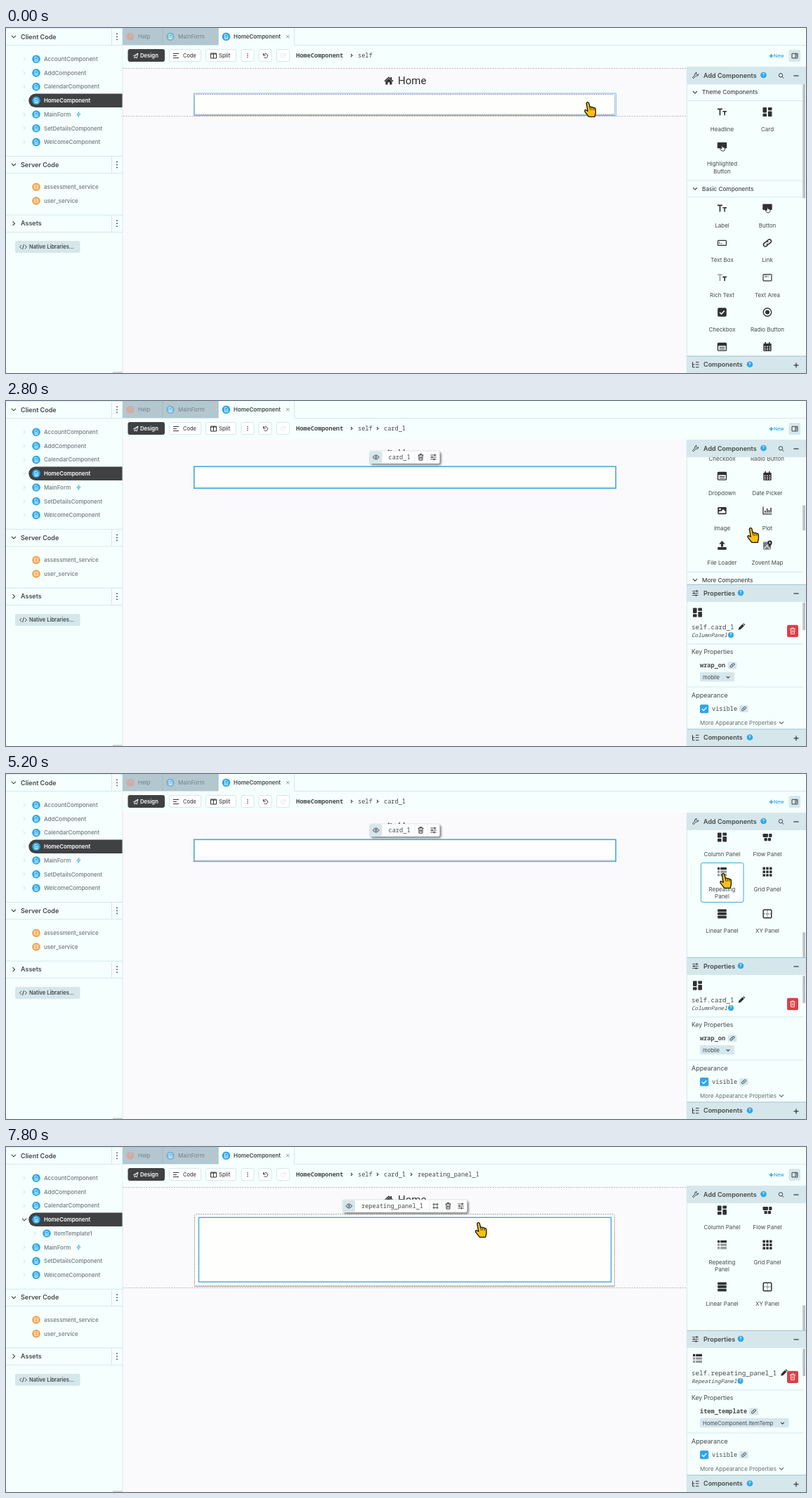
An HTML page that plays this animation: 1139x491 px, repeating every 8 s.

```html
<!DOCTYPE html>
<html lang="en">
<head>
<meta charset="utf-8">
<title>App designer</title>
<style>
html, body { margin: 0; width: 100%; height: 100%; overflow: hidden; background: #f5fffd; }
svg { display: block; width: 100%; height: 100%; }
text { font-family: Inter, sans-serif; font-size: 8px; fill: #43484b; white-space: pre; }
.mono { font-family: "Noto Sans Mono", monospace; }
</style>
</head>
<body>
<svg id="stage" viewBox="0 0 1139 491"></svg>
<script>
const stage = document.getElementById('stage');
const MINT = '#f5fffd', PALE = '#d6e7ec', BLUE = '#2ea7e6', DARK = '#3f4143', INK = '#2f3133', ORANGE = '#f3a14d';
const EDGE = '#9cc5d3', SOFT_BLUE = '#45a9d6';

// Basic shapes
const rect = (x, y, w, h, fill, more = '') => `<rect x="${x}" y="${y}" width="${w}" height="${h}" fill="${fill}" ${more}/>`;
const circle = (x, y, r, fill, more = '') => `<circle cx="${x}" cy="${y}" r="${r}" fill="${fill}" ${more}/>`;
const line = (d, color, width = 1, more = '') => `<path d="${d}" fill="none" stroke="${color}" stroke-width="${width}" ${more}/>`;
const fill = (d, color) => `<path d="${d}" fill="${color}"/>`;
const at = (x, y, body) => `<g transform="translate(${x} ${y})">${body}</g>`;
const text = (x, y, s, size = 8, more = '') =>
  `<text x="${x}" y="${y + size * .36}" style="font-size:${size}px;${more}">${s}</text>`;
const mono = (x, y, s, size = 8.62, more = '') =>
  `<text class="mono" x="${x}" y="${y + size * .33}" style="font-size:${size}px;${more}">${s}</text>`;
const centered = 'text-anchor:middle;';
const chevronDown = (x, y, color = DARK, r = 3) => line(`M${x - r} ${y - r / 2}l${r} ${r}l${r} ${-r}`, color, 1.1);
const chevronRight = (x, y, color = DARK, r = 3) => line(`M${x - r / 2} ${y - r}l${r} ${r}l${-r} ${r}`, color, 1.1);
const dots = (x, y, gap = 4, r = .9) => [-gap, 0, gap].map(d => circle(x, y + d, r, DARK)).join('');
const help = (x, y, r = 4.3) => circle(x, y, r, BLUE) +
  text(x, y, '?', r * 1.4, centered + 'fill:#fff;font-weight:600');
const docBadge = (x, y, color = BLUE) => circle(x, y, 5.8, color) +
  at(x, y, line('M-2-3h2.6l1.6 1.6v4.6h-4.2zM-.9 .2h1.9M-.9 1.7h1.9', '#fff', .8));
const dbBadge = (x, y) => circle(x, y, 5.8, ORANGE) +
  line(`M${x - 2.6} ${y - 2.6}h5.2v5.2h-5.2zM${x - 2.6} ${y}h5.2`, '#fff', .8);
const minus = (x, y) => line(`M${x - 3.5} ${y}h7`, INK, 1.2);

const table = heads => rect(-6, -5, 12, 10, 'none', `stroke="${INK}" stroke-width="1.4" rx="1"`) +
  rect(-6, -5, 12, heads, INK) + line('M0-4v9M-6 1.5h12', INK, 1.2);
const grid = (size, step) => [-1, 0, 1].map(r => [-1, 0, 1].map(c =>
  rect(c * step - size / 2, r * step - size / 2, size, size, INK, 'rx=".6"')).join('')).join('');
const letters = (small = INK) => line('M-6.5-4.2h7M-3-4.2v9', small === INK ? INK : '#999fa2', 1.7) +
  line('M.8-.8h5.8M3.7-.8v5.6', INK, 1.6);
const chain = (scale, width) => `<g transform="rotate(-40) scale(${scale})">` +
  line('M-.6 2.3h-2.9a2.3 2.3 0 0 1 0-4.6h2.9a2.3 2.3 0 0 1 2.1 2.3M.6-2.3h2.9a2.3 2.3 0 0 1 0 4.6h-2.9a2.3 2.3 0 0 1-2.1-2.3', INK, width) + '</g>';

const icons = {
  letters: letters(),
  rich: letters('#888'),
  card: rect(-6.5, -6.5, 5.6, 7.4, INK, 'rx=".8"') + rect(-6.5, 2.2, 5.6, 4.3, INK, 'rx=".8"') +
    rect(.9, -6.5, 5.6, 4.3, INK, 'rx=".8"') + rect(.9, -.9, 5.6, 7.4, INK, 'rx=".8"'),
  button: rect(-6.7, -6, 13.4, 8.5, INK, 'rx="1"') +
    `<path d="M0-2.5l1 3.2 3 1v2.5l-1.2 2H-.5L-3 3.2l1-.8 1 .8z" fill="#eef5f5" stroke="${INK}" stroke-width=".9"/>`,
  field: rect(-6, -3.5, 12, 7, 'none', `stroke="${INK}" stroke-width="1.2" rx="1"`) + line('M-3.8-1.4v2.8M-2 1h2', INK, .9),
  chain: chain(1.1, 1.4),
  area: rect(-6, -4.6, 12, 9.2, 'none', `stroke="${INK}" stroke-width="1.2" rx="1"`) + text(-4.2, -1.3, 'abc', 4),
  check: rect(-6.3, -6.3, 12.6, 12.6, INK, 'rx="1.8"') + line('M-3.3.2l2.4 2.4 4.2-4.6', '#fff', 1.5),
  radio: circle(0, 0, 5.7, 'none', `stroke="${INK}" stroke-width="1.4"`) + circle(0, 0, 3, INK),
  list: rect(-6, -5.3, 12, 10.6, 'none', `stroke="${INK}" stroke-width="1.4" rx="1.2"`) + rect(-6, -5.3, 12, 3.8, INK) +
    line('M-3.8 .7h7.6M-3.8 3h7.6', INK, 1.1),
  date: rect(-5.7, -4.8, 11.4, 11, INK, 'rx="1"') + line('M-2.8-6.8v3M2.8-6.8v3', INK, 1.6) +
    line('M-4.3-.4h8.6M-4.3 2h8.6M-4.3 4.3h8.6', '#fff', 1.2, 'stroke-dasharray="1.7 1.75"'),
  image: rect(-6.2, -5.2, 12.4, 10.4, INK, 'rx="1.4"') + circle(-3, -2.2, 1.3, '#fff') + fill('M-4.8 3.5v-1.4l2-2 1.3 1.2 3-3.3 3.3 3.2v2.3z', '#fff'),
  plot: line('M-6-5.6v10.4h12.3', INK, 1.3) + line('M-3 3v-3M-.3 3v-6M2.4 3v-4M5 3v-7', INK, 1.5),
  upload: fill('M0-6.5l4.3 4.6h-2.8v4h-3v-4h-2.8z', INK) + rect(-6.3, 2.6, 12.6, 3.8, INK, 'rx=".8"'),
  map: rect(-6, -5, 11, 11, '#777d80', 'rx="1"') + line('M-5 5l9-9M-1 .5l5 5', '#e9efef', 1.2) +
    fill('M3.5 2.2C1-1 .3-2.1.3-3.6a3.2 3.2 0 0 1 6.4 0c0 1.5-.7 2.6-3.2 5.8z', INK) + circle(3.5, -3.6, 1.1, '#fff'),
  clock: circle(0, 0, 5.7, 'none', `stroke="${INK}" stroke-width="1.4"`) + line('M0-3.3v3.5l2.5 1.5', INK, 1.3),
  spacer: line('M0-6v12M-3-3l3-3 3 3M-3 3l3 3 3-3', INK, 1.4),
  video: rect(-6.5, -4.8, 13, 9.6, INK, 'rx="2"') + fill('M-1.8-2.6l4.4 2.6-4.4 2.6z', '#fff'),
  table: table(3.2),
  tableRow: table(4.6),
  flow: rect(-6.5, -5, 7.5, 5, INK, 'rx=".8"') + rect(2.2, -5, 4.3, 5, INK, 'rx=".8"') +
    rect(-4.5, 1.2, 4.3, 4.2, INK, 'rx=".8"') + rect(.8, 1.2, 4.3, 4.2, INK, 'rx=".8"'),
  repeat: [-4.6, 0, 4.6].map((y, i) => rect(-6.5, y - 1.7, 3.2, 3.3, i ? '#95999c' : INK) +
    rect(-2.3, y - 1.7, 8.8, 3.3, i ? '#95999c' : INK)).join(''),
  grid: grid(3.6, 4.8),
  linear: [-4.6, 0, 4.6].map(y => rect(-6.3, y - 1.9, 12.6, 3.7, INK, 'rx=".6"')).join(''),
  xy: rect(-5.8, -5.8, 11.6, 11.6, 'none', `stroke="${INK}" stroke-width="1.5" rx="1"`) +
    line('M0-4.5v9M-4.5 0h9', INK, 1, 'stroke-dasharray="1.4 1.3"'),
  eye: line('M-4.5 0q4.5-6 9 0q-4.5 6-9 0z', INK, .9) + circle(0, 0, 1.3, 'none', `stroke="${INK}" stroke-width=".8"`),
  trash: line('M-3.8-3h7.6M-1.3-3.2v-1.2h2.6v1.2M-2.8-3l.4 7.2h4.8l.4-7.2M-.9-1v3.4M.9-1v3.4', 'currentColor', .8),
  sliders: line('M-4.3-3h8.6M-4.3 0h8.6M-4.3 3h8.6', INK, .8) + line('M2-4.2v2.4M-2-1.2v2.4M1 1.8v2.4', INK, 1.3),
  crop: line('M-4-2.5h8M-4 2.5h8M-2.5-4v8M2.5-4v8', INK, .8),
  pencil: fill('M-4.3 4.3l.8-3.2 5-5 2.4 2.4-5 5zM2.2-4.4l1-.9 2.2 2.2-.9 1z', INK),
  tree: line('M-4-4v7.5h3M-4-.3h3M.5-3.6h4.5M.5-.3h4.5M.5 3.5h4.5', INK, 1),
  wrench: line('M1.6-4.2a2.7 2.7 0 0 0-2.2 3.7l-3.5 3.4 1.3 1.3 3.5-3.4a2.7 2.7 0 0 0 3.6-2.6l-1.6 1.2-1.7-1.7z', INK, .9),
  link: rect(-6.3, -5, 12.6, 10, PALE, 'rx="1.8"') + chain(.62, 1.3),
};
const icon = (name, x, y) => at(x, y, icons[name]);

const sections = [
  ['Theme Components', 'Headline letters', 'Card card', 'Highlighted|Button button'],
  ['Basic Components', 'Label letters', 'Button button', 'Text Box field', 'Link chain', 'Rich Text rich', 'Text Area area',
    'Checkbox check', 'Radio Button radio', 'Dropdown list', 'Date Picker date', 'Image image', 'Plot plot',
    'File Loader upload', 'Zovent Map map'],
  ['More Components', 'Spacer spacer', 'Timer clock', 'Canvas area', 'Video video', 'Slot field', 'Hidden Box xy',
    'Data Grid table', 'Data Row Panel tableRow', 'Column Panel card', 'Flow Panel flow', 'Repeating|Panel repeat',
    'Grid Panel grid', 'Linear Panel linear', 'XY Panel xy'],
];

function componentList(highlight) {
  let y = 91.5, out = '';
  for (const [title, ...items] of sections) {
    out += line(`M969 ${y - 11.5}h166M969 ${y + 12}h166`, PALE) + chevronDown(981, y) +
      text(991, y, title, 8.2, 'font-weight:500');
    y += 28;
    for (let i = 0; i < items.length; i += 2) {
      let extra = 0;
      items.slice(i, i + 2).forEach((item, col) => {
        const cut = item.lastIndexOf(' '), words = item.slice(0, cut).split('|'), x = col ? 1084 : 1019.5;
        const name = item.slice(cut + 1);
        if (highlight && name === 'repeat') {
          out += rect(989.5, Math.round(y - 13) + .5, 60.5, 56, '#fbffff', `rx="2.5" stroke="${SOFT_BLUE}"`);
        }
        out += icon(name, x, y) + words.map((w, n) => text(x, y + 24.6 + n * 10.4, w, 8, centered)).join('');
        if (words.length > 1) extra = 10.5;
      });
      y += 49.3 + extra;
    }
  }
  return out;
}

function sidebar(dropped) {
  const shift = dropped ? 19.7 : 0;
  const names = ['AccountComponent', 'AddComponent', 'CalendarComponent', 'HomeComponent', 'MainForm', 'SetDetailsComponent', 'WelcomeComponent'];
  const head = (y, label, open) => line(`M0 ${y - 12}h166M0 ${y + 12.3}h166M150.5 ${y - 12}v24`, PALE) +
    (open ? chevronDown : chevronRight)(11, y) + text(21, y, label, 9, 'font-weight:600') + dots(158, y);
  const soft = 'font-weight:500;fill:#70787d';
  let out = rect(0, 0, 166, 491, MINT) + head(12.3, 'Client Code', true);
  names.forEach((name, i) => {
    const y = 44.2 + i * 19.7 + (i > 3 ? shift : 0), active = i === 3;
    if (active) out += `<path d="M166 ${y - 9.7}H42a9.7 9.7 0 0 0 0 19.4H166z" fill="${DARK}"/>`;
    out += (active && dropped ? chevronDown(26, y) : chevronRight(26, y, '#dce9e9', 2.5)) + docBadge(43, y) +
      text(54, y, name, active ? 7.8 : 8, active ? 'font-weight:600;fill:#fff' : soft);
    if (i === 4) out += line(`M104 ${y - 3.5}l-3.2 4h2.6l-.8 3 3.4-4.2h-2.6z`, BLUE, .8);
  });
  if (dropped) out += chevronRight(41, 123, '#dce9e9', 2.5) + docBadge(58, 123) + text(68, 123, 'ItemTemplate1', 8, soft);
  return out + at(0, shift, head(194.5, 'Server Code', true) +
    dbBadge(43, 226.3) + text(54, 226.3, 'assessment_service', 8, soft) +
    dbBadge(43, 246) + text(54, 246, 'user_service', 8, soft) + head(278.2, 'Assets', false) +
    rect(13, 303, 92.5, 17, PALE, 'rx="2"') + line('M22 309l-2.5 2.5 2.5 2.5M27 309l2.5 2.5-2.5 2.5M25.5 308l-2 7', INK, .9) +
    text(33, 311.3, 'Native Libraries...', 7.5, 'font-weight:600')) + rect(152, 489.5, 14, 1.5, '#c3cccc') +
    line('M166 0v491', PALE);
}

function topBars(selected, dropped) {
  const box = (x, w, color = '#fff') => rect(x, 30.5, w, 17, color, `rx="2" stroke="${color === '#fff' ? PALE : color}"`);
  const crumbs = [['self', 501], ...(selected ? [['card_1', 538]] : []), ...(dropped ? [['repeating_panel_1', 586]] : [])];
  return rect(166, 0, 973, 55, MINT) + rect(166, 0, 136, 24, '#b3c7cf') + line('M223 0v24M302 0v24', '#a2bac4') +
    line('M166 24.5h136M411 24.5h728M410.5 0v24', PALE) +
    circle(177, 12.3, 5.5, '#d5a9a1') + text(177, 12.3, '?', 7, centered + 'fill:#b3c7cf;font-weight:700') +
    text(188, 12.3, 'Help', 8, 'fill:#71838c') + docBadge(234, 12.3, '#72b7d8') + text(245, 12.3, 'MainForm', 8, 'fill:#71838c') +
    docBadge(313.5, 12.3) + text(324, 12.3, 'HomeComponent', 7.9, 'font-weight:600') + line('M399 10l4.4 4.4m0-4.4l-4.4 4.4', '#888', .9) +
    box(174, 51.5, DARK) + line('M181 40l7-4-1.8 7-2-1.5-1.2 1.5v-2.3l5-4.7', '#fff', .9) + text(191, 39.3, 'Design', 7.7, 'font-weight:600;fill:#fff') +
    box(232.5, 45) + line('M238 36.5h8M238 39.5h5M238 42.5h8', INK, 1) + text(252, 39.3, 'Code', 7.4, 'font-weight:500') +
    box(284.5, 43) + line('M291.5 36h8v7h-8zM295.5 36v7M291.5 37h8', INK, 1) + text(303, 39.3, 'Split', 7.8, 'font-weight:500') +
    box(335, 18) + dots(344, 39.3, 2.5, .8) + box(360, 18) +
    line('M366.5 36v3h3M366.7 38.7a3 3 0 1 1 .6 2.8', INK, .9) + box(385.5, 18) + line('M397.5 36v3h-3M397.3 38.7a3 3 0 1 0-.6 2.8', '#dce6e8', .9) +
    mono(413, 39, 'HomeComponent', 8.62, 'font-weight:700') +
    crumbs.map(([s, x]) => chevronRight(x - 9, 39, DARK, 2) + mono(x, 39, s)).join('') +
    fill('M1089.5 36l1 2.8 2.7 1-2.7 1-1 2.7-1-2.7-2.6-1 2.6-1z', BLUE) + text(1093, 39.8, 'New', 6.8, `font-weight:500;fill:${BLUE}`) +
    rect(1114.5, 31, 16.5, 17, PALE, 'rx="2"') + line('M1119 36.3h8v6.6h-8zM1124 36v7M1125 38h1.5M1125 40h1.5', INK, .9);
}

function toolbar(x, y, w, name, kinds) {
  return rect(x + 2, y + 2, w, 18, '#000', 'opacity=".55" rx="3" filter="url(#blur)"') + rect(x, y, w, 18, '#fff', 'rx="2" stroke="#d0d5d8" stroke-width=".6"') +
    rect(x + .5, y + .5, 17.5, 17, PALE, 'rx="2"') + icon('eye', x + 9.3, y + 9) + mono(x + 27, y + 9, name, 8.65) +
    kinds.map((kind, i) => line(`M${x + w - (kinds.length - i) * 18 + .5} ${y}v18`, '#e4eaec', .8) +
      icon(kind, x + w - (kinds.length - i) * 18 + 9, y + 9)).join('');
}

function canvas({ selected, dragging, shifted, dropped }) {
  const dash = (y, color = '#b3b8bc') => line(`M167 ${y}H969`, color, 1, 'stroke-dasharray="2 1.6"');
  const card = (y, h) => rect(268, y + 1, 599, h + .7, '#aaadb0', 'rx="2" opacity=".7"') +
    rect(268.5, y, 598, h, '#fefefd', 'rx="2" stroke="#a3a6a9" stroke-dasharray="2 1.2"');
  let out = rect(166.5, 55, 803, 436, '#fafafc') +
    fill('M538.5 75.3l6.4-6 2.5 2.2v-1.6h1.8v3.3l2.4 2.1-1 1.1-5.7-5.2-5.5 5.2zM540.4 76l4.5-4 4.6 4v4.6h-3.2v-3.4h-2.8v3.4h-3.1z', INK) +
    text(558, 75, 'Home', 15, 'font-family:Roboto,sans-serif;fill:#2b2b2d');
  if (!selected) {
    out += dash(57.5) + dash(125.5) + card(94.5, 28.5) +
      rect(267.5, 93, 601, 31.7, 'none', `stroke="${BLUE}" stroke-opacity=".7"`);
  } else if (dropped) {
    out += dash(57.5) + dash(200.5) + card(95.5, 102) +
      rect(274.5, 100.3, 587, 91.7, '#fefefd', `stroke="${SOFT_BLUE}" stroke-width="1.4"`);
  } else if (shifted) {
    out += dash(57.5) + dash(132) + card(101.5, 28);
  } else if (dragging) {
    out += dash(57.5, '#c09a88') + dash(125.5, '#c09a88') + line('M273 58.5h589M264.5 61v29M871.5 61v29', '#d8dadd') +
      card(94.5, 28.5) + line('M285 99.8h565', '#dddfe0') + line('M273 125.3h589', BLUE, 1.8);
  } else {
    out += rect(267.8, 93.3, 600.4, 31, '#fefefc', `stroke="${SOFT_BLUE}" stroke-width="1.6"`) + line('M269 122.8h598', '#c9cccb');
  }
  if (dropped) out += toolbar(479, 75, 177.5, 'repeating_panel_1', ['crop', 'trash', 'sliders']);
  else if (selected) out += toolbar(517.5, 71, 100, 'card_1', ['trash', 'sliders']);
  return out;
}

const panelHead = (y, h, glyph, label, helpX, tools) => rect(969, y, 170, h, PALE) +
  icon(glyph, 981.5, y + h / 2) + text(993, y + h / 2, label, 9, 'font-weight:600') + help(helpX, y + h / 2 - .5) + tools;

function properties(dropped) {
  const [name, kind, key, value] = dropped
    ? ['self.repeating_panel_1', 'RepeatingPanel', 'item_template', 'HomeComponent.ItemTemp']
    : ['self.card_1', 'ColumnPanel', 'wrap_on', 'mobile'];
  const bold = 'font-weight:600', width = dropped ? 126.5 : 49;
  return rect(969, 261, 170, 206, MINT) + panelHead(261, 25, 'sliders', 'Properties', 1046, minus(1125, 274)) +
    line('M969 261.3h170', EDGE) +
    icon(dropped ? 'repeat' : 'card', 984.5, 301) + mono(976, 322, name, 9.2) + icon('pencil', dropped ? 1107.5 : 1047, 321.5) +
    mono(976, 333.5, kind, 7.7, 'font-style:italic') + help(dropped ? 1045.5 : 1032, 333, 4) +
    rect(1112, 318.7, 16, 17.3, '#dc3f47', 'rx="2"') + at(1120, 327.3, `<g color="#fff">${icons.trash}</g>`) +
    line('M969 345.8h166M969 407h166', PALE) + text(976, 357, 'Key Properties', 8.6) +
    mono(988, 376.5, key, 8.62, bold) + icon('link', dropped ? 1064.5 : 1034, 376.3) +
    rect(988, 386, width, 13.3, PALE, 'rx="2"') + text(992, 393, value, 7.6) + chevronDown(988 + width - 9, 393, DARK, 2.4) +
    text(976, 418.7, 'Appearance', 9) + rect(988, 432, 12.3, 12.3, BLUE, 'rx="2"') + line('M991 438.3l2.3 2.3 4-4.5', '#fff', 1.4) +
    mono(1005, 438.3, 'visible', 8.62, 'font-weight:500') + icon('link', 1050.5, 438) +
    text(988, 457.8, 'More Appearance Properties', 8, 'fill:#666e72') + chevronDown(1104, 458, '#666e72') +
    rect(1134.3, 287, 3.7, 39, '#bcc2c4');
}

function inspector({ selected, dropped, highlight, scroll }) {
  const view = selected ? 181 : 386, total = 918, thumb = view * view / total;
  return rect(969, 55, 170, 436, MINT) +
    `<g clip-path="url(#${selected ? 'short' : 'tall'})">${at(0, -scroll, componentList(highlight))}</g>` +
    rect(1134.3, 80 + scroll / total * view, 3.7, thumb, '#bcc2c4') +
    panelHead(55, 25, 'wrench', 'Add Components', 1078.5, circle(1103, 67.3, 2.7, 'none', `stroke="${INK}" stroke-width=".9"`) +
      line('M1105 69.3l2.4 2.4', INK, .9) + minus(1125, 68)) +
    (selected ? properties(dropped) : '') +
    panelHead(467, 24.5, 'tree', 'Components', 1059, minus(1125, 480) + line('M1125 476.5v7', INK, 1.2)) +
    line('M969 467h170', EDGE) + line('M969.3 55v436', PALE);
}

const shapes = {
  hand: 'M-2.2 1.2Q-1-1.4 1.2.4L2.8 6.6Q4.4 5.4 5.4 7Q7.2 5.8 8.2 7.7Q10.4 7 10.9 9.3L11 15L9.7 20.3H1.4L-4.2 13.4Q-5.2 11-3.2 10.5L-.2 12.3Z',
  arrow: 'M0 0V16L4 12.6L6.4 17.6L9.2 16.3L6.9 11.6L12 11.2Z',
};
const cursor = (kind, x, y) => at(x - .5, y, `<path d="${shapes[kind]}" fill="#fdc010" stroke="#141414" stroke-width="1.3" stroke-linejoin="round"/>` +
  (kind === 'hand' ? line('M2.8 7l.8 4M5.4 7.5l.6 3.4M8.2 8l.4 3', '#141414', .8) : ''));

// Linear interpolation through [time, ...values] stops
function follow(stops, t) {
  const next = stops.findIndex(s => s[0] > t);
  if (next < 0) return stops.at(-1).slice(1);
  const a = stops[Math.max(next - 1, 0)], b = stops[next], k = (t - a[0]) / (b[0] - a[0]);
  return a.slice(1).map((v, i) => v + (b[i + 1] - v) * k);
}
const path = [[0, 829, 106], [400, 829, 106], [1000, 1073, 295], [1400, 1062, 190], [2800, 1061, 181], [4200, 1062.5, 184],
  [4600, 1062.5, 184], [5000, 1022, 142], [5200, 1022, 142], [6200, 644.5, 165.5], [6600, 645, 160], [7200, 666, 110], [7400, 667.5, 108], [7800, 673.5, 108]];
const scrolling = [[0, 0], [1400, 0], [2800, 347], [4200, 680], [4600, 737]];

const defs = `<defs><filter id="blur" x="-10%" y="-50%" width="120%" height="200%"><feGaussianBlur stdDeviation="1.8"/></filter>
  <clipPath id="tall">${rect(969, 80, 170, 387, '#000')}</clipPath><clipPath id="short">${rect(969, 80, 170, 181, '#000')}</clipPath></defs>`;

function draw(t) {
  const state = {
    selected: t >= 400, dragging: t >= 5400, shifted: t >= 7000, dropped: t >= 7600,
    highlight: t >= 5000 && t < 7600, scroll: Math.round(follow(scrolling, t)[0]),
  };
  const arrow = (t >= 600 && t < 1400) || (t >= 5400 && t < 7000);
  stage.innerHTML = defs + canvas(state) + sidebar(state.dropped) + topBars(state.selected, state.dropped) +
    inspector(state) + cursor(arrow ? 'arrow' : 'hand', ...follow(path, t));
}

let shown = -1;
function tick() {
  const t = Math.floor(performance.now() % 8000 / 200) * 200;
  if (t !== shown) draw(shown = t);
  requestAnimationFrame(tick);
}
tick();
</script>
</body>
</html>
```
